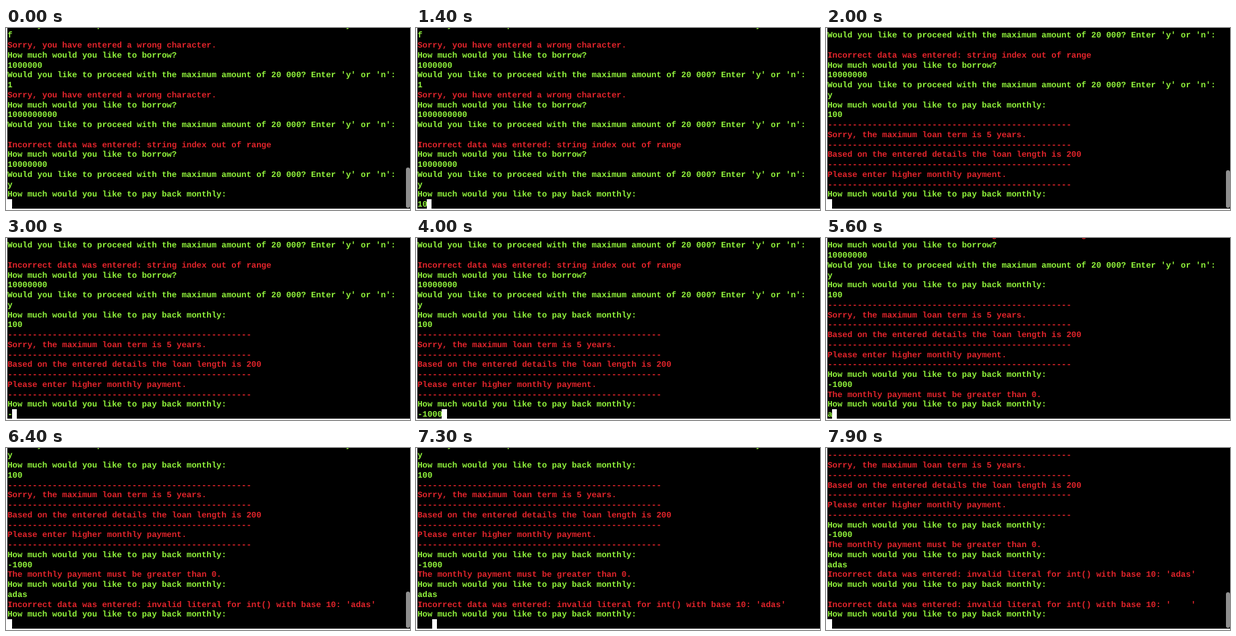
These frames come from a looping animation (599x270 px, 8000 ms). An HTML page:

```html
<!DOCTYPE html>
<html lang="en">
<head>
<meta charset="utf-8">
<title>Loan terminal</title>
<style>
  html, body { margin: 0; width: 100%; height: 100%; overflow: hidden; background: #000; }
  #stage { position: relative; width: 599px; height: 270px; overflow: hidden; background: #000; }
  #text {
    position: absolute; left: 2.2px; bottom: 0;
    font: bold 12.3px/14.78px "Liberation Mono", "Courier New", monospace;
    text-rendering: geometricPrecision; white-space: pre; color: #92f53c;
  }
  #text div { height: 14.78px; }
  #text .error { color: #e3242b; }
  #cursor { position: absolute; top: 254px; width: 7.2px; height: 15px; background: #fff; }
  #bar { position: absolute; left: 593px; width: 6px; border-radius: 3px; background: #8f8f8f; }
  .edge { position: absolute; left: 0; bottom: 0; background: #fff; }
</style>
</head>
<body>
<div id="stage">
  <div id="text"></div>
  <div id="cursor"></div>
  <div id="bar"></div>
  <div class="edge" style="width:1.5px;height:270px"></div>
  <div class="edge" style="width:599px;height:2px"></div>
</div>
<script>
const LOOP = 8000, CHAR = 7.38;
const text = document.getElementById('text');
const cursor = document.getElementById('cursor');
const bar = document.getElementById('bar');

// Lines starting with "!" are printed in red.
const rule = '!' + '-'.repeat(49);
const borrow = 'How much would you like to borrow?';
const proceed = "Would you like to proceed with the maximum amount of 20 000? Enter 'y' or 'n':";
const wrong = '!Sorry, you have entered a wrong character.';
const monthly = 'How much would you like to pay back monthly:';
const invalid = s => `!Incorrect data was entered: invalid literal for int() with base 10: '${s}'`;

// at: when the lines appear; keys: when each typed character appears; top: scrollbar top
const steps = [
  { at: 0, top: 207, input: '100', keys: [1100, 1300, 1500], lines: [
    proceed, 'f', wrong, borrow, '1000000', proceed, '1', wrong, borrow, '1000000000', proceed, '',
    '!Incorrect data was entered: string index out of range',
    borrow, '10000000', proceed, 'y', monthly] },
  { at: 1800, top: 211, input: '-1000', keys: [2900, 3300, 3600, 3700, 3900], lines: [
    '100', rule, '!Sorry, the maximum loan term is 5 years.',
    rule, '!Based on the entered details the loan length is 200',
    rule, '!Please enter higher monthly payment.', rule, monthly] },
  { at: 4400, top: 212, input: 'adas', keys: [5500, 5800, 6000, 6200], lines: [
    '-1000', '!The monthly payment must be greater than 0.', monthly] },
  { at: 6400, top: 213, input: '    ', keys: [6900, 7100, 7300, 7500], lines: [
    'adas', invalid('adas'), monthly] },
  { at: 7700, top: 214, input: '', keys: [], lines: ['    ', invalid('    '), monthly] }
];

function lineNode(line) {
  const div = document.createElement('div');
  const red = line[0] === '!';
  div.textContent = red ? line.slice(1) : line;
  if (red) div.className = 'error';
  return div;
}

let shown = '';
function draw(now) {
  const t = now % LOOP;
  const past = steps.filter(s => s.at <= t);
  const step = past[past.length - 1];
  const typed = step.keys.filter(k => k <= t).length;
  const state = past.length + ':' + typed;
  if (state !== shown) {
    shown = state;
    const lines = past.flatMap(s => s.lines).concat(step.input.slice(0, typed));
    text.replaceChildren(...lines.map(lineNode));
    cursor.style.left = 1.5 + typed * CHAR + 'px';
    bar.style.top = step.top + 'px';
    bar.style.height = 267 - step.top + 'px';
  }
  // The scrollbar fades out shortly after each scroll.
  bar.style.opacity = Math.max(0, Math.min(1, (750 - (t - step.at)) / 250));
}

const start = performance.now();
function tick() {
  draw(performance.now() - start);
  requestAnimationFrame(tick);
}
tick();
</script>
</body>
</html>
```
